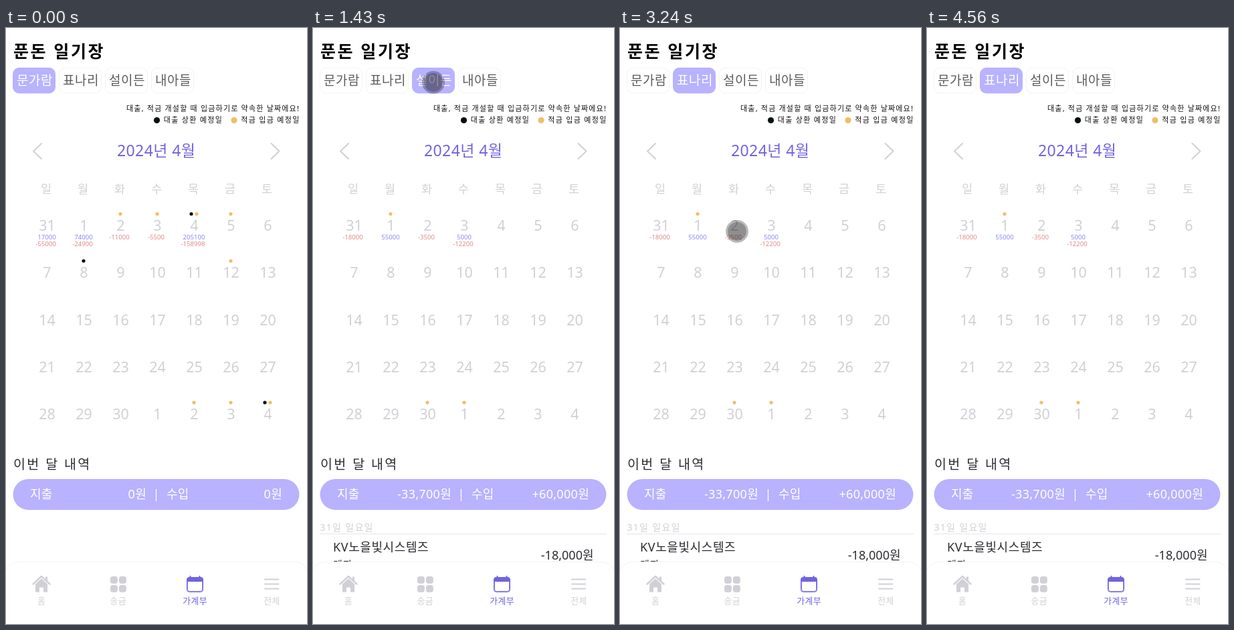
These frames come from a looping animation (450x888 px, 4630 ms). An HTML page:

```html
<!DOCTYPE html>
<html lang="ko">
<head>
<meta charset="utf-8">
<style>
html, body { margin: 0; width: 100%; height: 100%; overflow: hidden; background: #fff; }
svg { display: block; width: 450px; height: 888px; }
text { font-family: "Noto Sans", "Noto Sans CJK KR", "Noto Sans CJK", sans-serif; white-space: pre; }
</style>
</head>
<body>
<svg id="stage" viewBox="0 0 450 888"></svg>
<script>
const LOOP = 4630;
const C = { main: '#b8b2ff', deep: '#7064e0', pale: '#d1d0d6', ink: '#2b2b31', edge: '#f3f2f6',
            black: '#061208', gold: '#efbe66', plus: '#8c86ff', minus: '#e08a84', brown: '#5a3520' };
const stage = document.getElementById('stage');

// Markup helpers
const txt = (s, x, y, size, fill, ls = 0, anchor = 'start', weight = 400) =>
  `<text x="${x}" y="${y}" font-size="${size}" fill="${fill}" letter-spacing="${ls}" text-anchor="${anchor}" font-weight="${weight}">${s}</text>`;
const rect = (x, y, w, h, r, fill, stroke = 'none') =>
  `<rect x="${x}" y="${y}" width="${w}" height="${h}" rx="${r}" fill="${fill}" stroke="${stroke}"/>`;
const dot = (x, y, r, fill) => `<circle cx="${x}" cy="${y}" r="${r}" fill="${fill}"/>`;
const line = (d, color, w = 2) =>
  `<path d="${d}" fill="none" stroke="${color}" stroke-width="${w}" stroke-linecap="round" stroke-linejoin="round"/>`;
const chevron = (x, y, dir, color) => line(`M${x} ${y - 11.5}l${12 * dir} 11.5l${-12 * dir} 11.5`, color);

const NAMES = ['문가람', '표나리', '설이든', '내아들'];
const colX = i => 61.5 + 55 * (i % 7);
const rowY = i => Math.round(294 + 70.25 * Math.floor(i / 7));

// Cells with a loan or savings due, and the sums from the first cell on
const BOOKS = {
  first: {
    loans: [4, 8, 34], savings: [2, 3, 4, 5, 12, 32, 33, 34],
    sums: [[17000, -55000], [74000, -24900], [-11000], [-5500], [205100, -158998]]
  },
  second: {
    loans: [], savings: [1, 30, 31],
    sums: [[-18000], [55000], [-3500], [5000, -12200]],
    out: '-33,700원', inc: '+60,000원', outX: 207
  },
  empty: { loans: [], savings: [], sums: [] }
};

function summary(y, out = '0원', inc = '0원', outX = 210) {
  const t = (s, x, a) => txt(s, x, y + 29, 18, '#fff', 0.3, a);
  return rect(10.5, y, 428, 46, 23, C.main) + t('지출', 36) + t(out, outX, 'end') +
    t('|', outX + 14.7, 'middle') + t('수입', outX + 30) + t(inc, 413, 'end');
}

function chips(sel) {
  return NAMES.map((n, i) => {
    const x = 10.5 + 69 * i, on = i === sel;
    return rect(x, 59.5, 63, 37.5, 9, on ? C.main : '#fff', on ? C.main : C.edge) +
      txt(n, x + 5.5, 85, 19, on ? '#fff' : '#5c5c60', 0.5);
  }).join('');
}

function cell(book, i) {
  const x = colX(i), y = rowY(i);
  const day = i === 0 ? 31 : i > 30 ? i - 30 : i;
  const marks = [];
  if (book.loans.includes(i)) marks.push(C.black);
  if (book.savings.includes(i)) marks.push(C.gold);
  const sums = book.sums[i] || [];
  return txt(day, x, y + 8, 21.5, C.pale, 0, 'middle') +
    marks.map((c, k) => dot(x - 0.5 + (k - (marks.length - 1) / 2) * 8, y - 17, 2.6, c)).join('') +
    sums.map((v, k) => txt(v, x - (v < 0 ? 2 : 0.5), y + 21 + 10 * k, 9.6, v < 0 ? C.minus : C.plus, 0, 'middle')).join('');
}

function calendar(book) {
  let s = [...'일월화수목금토'].map((d, i) => txt(d, colX(i) - 1.5, 246, 17.5, C.pale, 0, 'middle')).join('');
  for (let i = 0; i < 35; i++) s += cell(book, i);
  return s;
}

const legend = (s, x, color) => dot(x, 137.5, 4.6, color) + txt(s, x + 10.3, 141.3, 11, '#111', 1.3);

// Name, account and amount of one payment; y is the name's baseline
const payment = (name, sum, y, ls) => txt(name, 30, y, 18, C.ink, ls) +
  txt('계좌', 30, y + 24.5, 15, C.ink, 1) + txt(sum, 419.5, y + 12, 18, C.ink, 0, 'end');

function bookPage(sel, book) {
  let s = txt('푼돈 일기장', 11, 44, 25, '#000', 2.6, 'start', 700) + chips(sel) +
    txt('대출, 적금 개설할 때 입금하기로 약속한 날짜에요!', 180, 124, 11, '#111', 1.2) +
    legend('대출 상환 예정일', 225.5, C.black) + legend('적금 입금 예정일', 341, C.gold) +
    chevron(53, 183.5, -1, C.pale) + chevron(396.5, 183.5, 1, C.pale) +
    txt('2024년 4월', 166, 191, 23, C.deep, 0.4) + calendar(book) +
    txt('이번 달 내역', 11, 656.5, 19.5, C.ink, 2.4) + summary(672, book.out, book.inc, book.outX);
  if (book.out) {
    s += txt('31일 일요일', 10.5, 748.5, 14, C.pale, 1.3) + rect(10, 753, 429, 1.5, 0, '#ededf1') +
      payment('KV노을빛시스템즈', '-18,000원', 780, 0.6);
  }
  return s;
}

const card = (y, sum) => rect(10.5, y, 428, 75, 22, '#eeedf8') + payment('솔바위pc방새터점', sum, y + 31.5, 0.9);

function face(x, y, sad) {
  const eyes = sad ? dot(-3, -1, 1.9, '#fff') + dot(3, -1, 1.9, '#fff') : '';
  return `<g transform="translate(${x} ${y})">` + dot(0, 0, 8.5, '#e9a552') + eyes +
    dot(-3, -1, 1.1, C.brown) + dot(3, -1, 1.1, C.brown) +
    line(sad ? 'M-3 4.5Q0 1.5 3 4.5' : 'M-3 2.5Q0 5.5 3 2.5', C.brown, 1.3) + '</g>';
}

const promise = (kind, y) => txt(`오늘 입금 약속한 내 ${kind}`, 11, y, 19.5, C.ink, 2.6) +
  txt(`입금 약속된 ${kind}이 없어요`, 135, y + 31, 14.5, '#111', 1.5);

function dayPage() {
  return chevron(34, 33, -1, '#4c4a5c') +
    txt('2024년 4월 2일', 53, 43.5, 24, C.ink, 1.9, 'start', 700) +
    summary(84.5, '-3,500원', '0원', 230) + card(150, '-2,500원') + card(238, '-1,000원') +
    promise('대출', 349) + promise('적금', 428) +
    face(241.5, 342, false) + txt('정상 납부 중', 254, 346, 12.5, '#5a55c0', 1.1) +
    face(343, 342, true) + txt('연체 횟수 남음', 356, 346, 12.5, '#c84a44', 1);
}

function nav() {
  let s = rect(-1.5, 795.5, 453, 120, 20, '#fff', C.edge) +
    line('M40.5 828.5L53 817L65.5 828.5', C.pale, 2.4) + rect(59, 817.5, 3, 6, 0, C.pale) +
    `<path d="M44 828.5L53 820.3L62 828.5V840.5H56V833.5H50V840.5H44Z" fill="${C.pale}"/>`;
  for (const x of [156, 169]) for (const y of [817, 830]) s += rect(x, y, 10.8, 10.8, 3.5, C.pale);
  s += rect(270.5, 818.5, 24, 21.7, 3.5, '#fff', C.deep) + rect(271.3, 819.3, 22.4, 20.1, 3, 'none', C.deep) +
    rect(270.5, 818.5, 24, 6.5, 2.5, C.deep) + line('M275.5 817V820M289.5 817V820', C.deep);
  for (let i = 0; i < 3; i++) s += line(`M387 ${821.5 + 7 * i}h20.5`, C.pale);
  ['홈', '송금', '가계부', '전체'].forEach((n, i) =>
    s += txt(n, 53 + 114.8 * i, 858, 12.8, i === 2 ? C.deep : C.pale, 0.4, 'middle'));
  return s;
}

// Screen changes: start time, chosen chip, book (none: day page)
const SCENES = [
  [0, 0, 'first'], [820, 1, 'first'], [960, 1, 'second'], [1430, 2, 'second'], [1560, 2, 'empty'],
  [1830, 3, 'empty'], [2300, 1, 'empty'], [2440, 1, 'second'], [3440], [4060, 1, 'second']
];

// Pointer moves: start, end, x, y reached
const MOVES = [
  [80, 550, 132, 114], [550, 700, 129, 75], [1160, 1400, 180, 81], [1560, 1700, 246, 82],
  [1840, 1970, 123, 105], [1970, 2200, 113, 78], [2480, 2710, 210, 202], [2770, 3110, 175, 303],
  [3500, 3780, 37, 27], [4060, 4550, 424, 910]
];

function pointer(t) {
  let x = 226, y = 517;
  for (const [t0, t1, toX, toY] of MOVES) {
    const k = Math.min(1, Math.max(0, (t - t0) / (t1 - t0)));
    const e = k * (2 - k);
    x += (toX - x) * e;
    y += (toY - y) * e;
  }
  return [x, y];
}

stage.innerHTML = '<rect width="450" height="888" fill="#fff"/><g id="page"></g>' + nav() +
  '<g id="touch"><circle r="14" fill="#000" fill-opacity=".44"/>' +
  '<circle r="15.5" fill="none" stroke="#000" stroke-opacity=".27" stroke-width="3"/></g>';
const page = document.getElementById('page'), touch = document.getElementById('touch');
let shown = null;

function draw(t) {
  const scene = SCENES.filter(s => s[0] <= t).pop();
  if (scene !== shown) {
    shown = scene;
    const [, sel, key] = scene;
    page.innerHTML = key ? bookPage(sel, BOOKS[key]) : dayPage();
  }
  const [x, y] = pointer(t);
  touch.setAttribute('transform', `translate(${x.toFixed(2)} ${y.toFixed(2)})`);
  touch.setAttribute('visibility', t >= 80 && t < 4550 ? 'visible' : 'hidden');
}

const start = performance.now();
function tick() {
  draw((performance.now() - start) % LOOP);
  requestAnimationFrame(tick);
}
tick();
</script>
</body>
</html>
```
